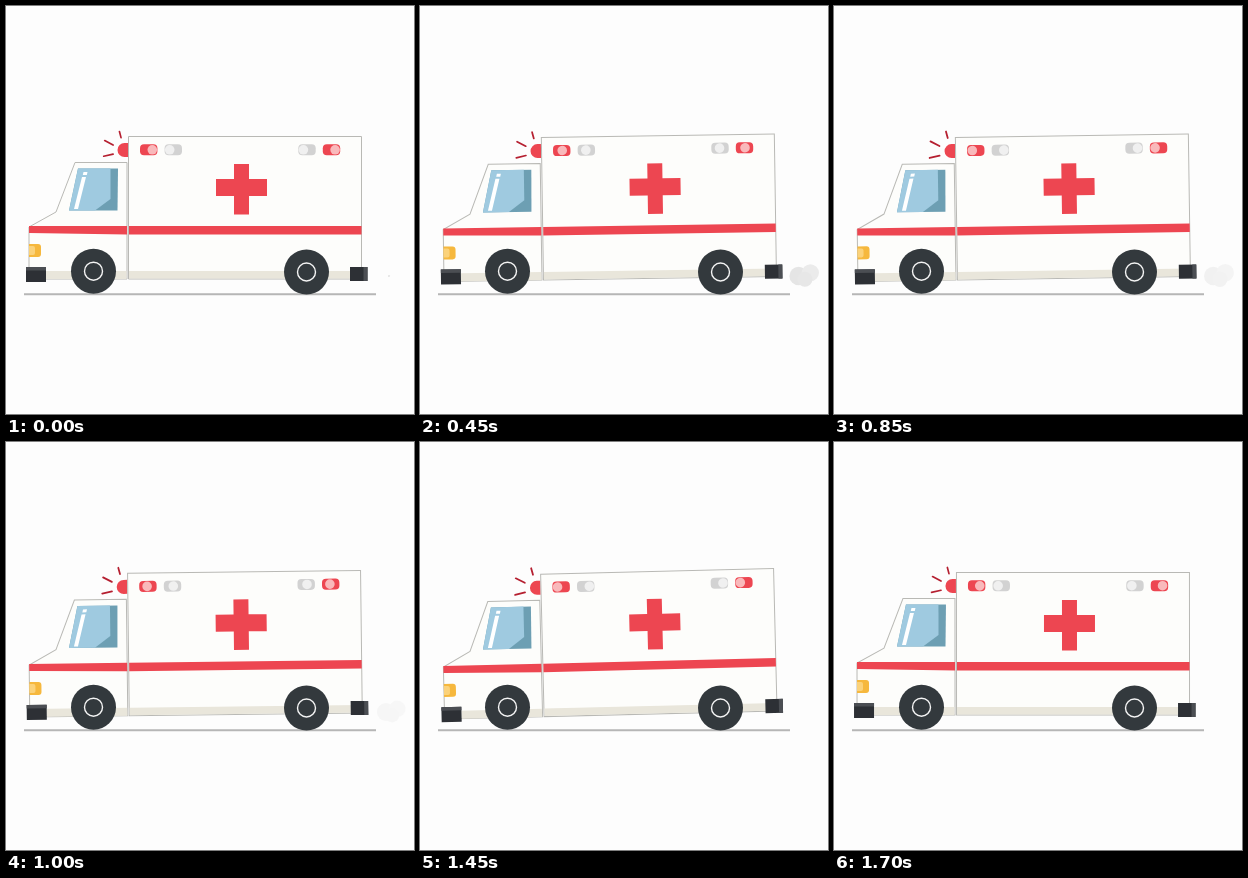
An HTML page for the animation above (1750 ms loop, 408x408 px).

```html
<!DOCTYPE html>
<html lang="en">
<head>
<meta charset="utf-8">
<title>Ambulance</title>
<style>
  html, body { margin: 0; width: 100%; height: 100%; overflow: hidden; background: #fdfdfd; }
  svg { display: block; width: 100%; height: 100%; }
  .red { fill: #ed4651; }
  .shell { fill: #fdfdfb; stroke: #b9b9b5; }
  .skirt { fill: #e9e6db; }
  .dark { fill: #2d3035; }
</style>
</head>
<body>
<svg viewBox="0 0 408 408">
  <path d="M18 288.3H370" stroke="#b6b6b6" stroke-width="2"/>
  <g id="smoke">
    <circle cx="-5" cy="0" r="8.5" fill="#dfdfdf"/>
    <circle cx="6" cy="-3" r="8" fill="#e6e6e6"/>
    <circle cx="1" cy="3" r="7" fill="#e1e1e1"/>
  </g>
  <g id="van">
    <g id="rays" stroke="#b51f30" stroke-width="1.7" stroke-linecap="round">
      <path d="M97.5 150.3L107 148.2M98.5 134.5L107 139M113.4 125.3L115 131.5"/>
    </g>
    <path class="red" d="M122 137H118.5A7 7 0 0 0 118.5 151H122Z"/>
    <path class="shell" d="M121 156.5H69L50 206L23 221V273H121Z"/>
    <path class="skirt" d="M40 265H120.5V273H40Z"/>
    <path class="shell" d="M122.5 130.5H355.5V273H122.5Z"/>
    <path class="skirt" d="M123 265H355V272.5H123Z"/>
    <path class="red" d="M23 220H121V228.5L23 227ZM123 220H355.5V228.5H123Z"/>
    <path class="red" d="M228 158H243V173H261V190H243V208.5H228V190H210V173H228Z"/>
    <path fill="#6d9fb3" d="M72 162.5H112L111.5 204.5H63Z"/>
    <path fill="#9fcae0" d="M72 162.5H104.5V193L89 204.5H63Z"/>
    <path fill="#fff" d="M76 171H80L72 203H68ZM77.5 166H81.5L80.8 169H76.8Z"/>
    <path fill="#f6b83d" d="M23 238H32Q35 238 35 241V248Q35 251 32 251H23Z"/>
    <path fill="#fbd27a" d="M23 240H27Q29 240 29 242V247Q29 249 27 249H23Z"/>
    <path class="dark" d="M20 261H40V276H20ZM344 261H361.5V275H344Z"/>
    <path fill="#4b4e53" d="M20 261H40V264.5H20ZM357.5 261H361.5V275H357.5Z"/>
    <g id="lamps"></g>
  </g>
  <g id="wheels"></g>
</svg>
<script>
const LOOP = 1750;
const $ = id => document.getElementById(id);

function add(parent, tag, attrs) {
  const el = document.createElementNS('http://www.w3.org/2000/svg', tag);
  for (const key in attrs) el.setAttribute(key, attrs[key]);
  return parent.appendChild(el);
}

for (const [cx, cy] of [[87.5, 265.2], [300.5, 266]]) {
  add($('wheels'), 'circle', { cx, cy, r: 22.5, fill: '#33393d' });
  add($('wheels'), 'circle', { cx, cy, r: 9, fill: 'none', stroke: '#f4f4f4', 'stroke-width': 1.4 });
}

// Each lamp: centre x, shell colour, glow colour, sweep direction.
const lamps = [
  [142.7, '#ed4651', '#f9b9bb', 1],
  [167.3, '#d2d2d2', '#f0f0f0', -1],
  [301, '#d2d2d2', '#f0f0f0', -1],
  [325.5, '#ed4651', '#f9b9bb', 1]
].map(([x, shell, glow, dir]) => {
  add($('lamps'), 'rect', { x: x - 8.7, y: 138.3, width: 17.4, height: 11, rx: 4, fill: shell });
  return { x, dir, glow: add($('lamps'), 'circle', { cy: 143.8, r: 4.8, fill: glow }) };
});

// Tables of [time, value].
const tilt = [[0, 0], [250, -.7], [650, -1.03], [1000, -.7], [1250, -1.4], [1450, -1.4], [1700, -.04], [LOOP, 0]];
const puffSize = [[0, .08], [250, 1], [650, 1.15], [1150, 1], [LOOP, .05]];
const puffAlpha = [[0, 1], [250, .95], [650, .6], [1000, .22], [1150, 0], [1720, 0], [LOOP, 1]];

function sample(steps, t) {
  const i = steps.findIndex(step => step[0] > t);
  const [t0, a] = steps[i - 1], [t1, b] = steps[i];
  return a + (b - a) * (t - t0) / (t1 - t0);
}

function draw(now) {
  const t = Math.floor(now % LOOP / 50) * 50;
  const sweep = Math.cos(t / LOOP * 6 * Math.PI);

  $('van').setAttribute('transform', `rotate(${sample(tilt, t)} 190 208)`);
  lamps.forEach(({ x, dir, glow }) => glow.setAttribute('cx', x + dir * sweep * 3.6));

  const reach = 1.02 - sweep * .03;
  $('rays').setAttribute('transform', `translate(118 144) scale(${reach}) translate(-118 -144)`);

  const drift = 383 + t / 500;
  $('smoke').setAttribute('transform', `translate(${drift} 270) scale(${sample(puffSize, t)})`);
  $('smoke').setAttribute('opacity', sample(puffAlpha, t));
}

const start = performance.now();
function tick() {
  draw(performance.now() - start);
  requestAnimationFrame(tick);
}
tick();
</script>
</body>
</html>
```
